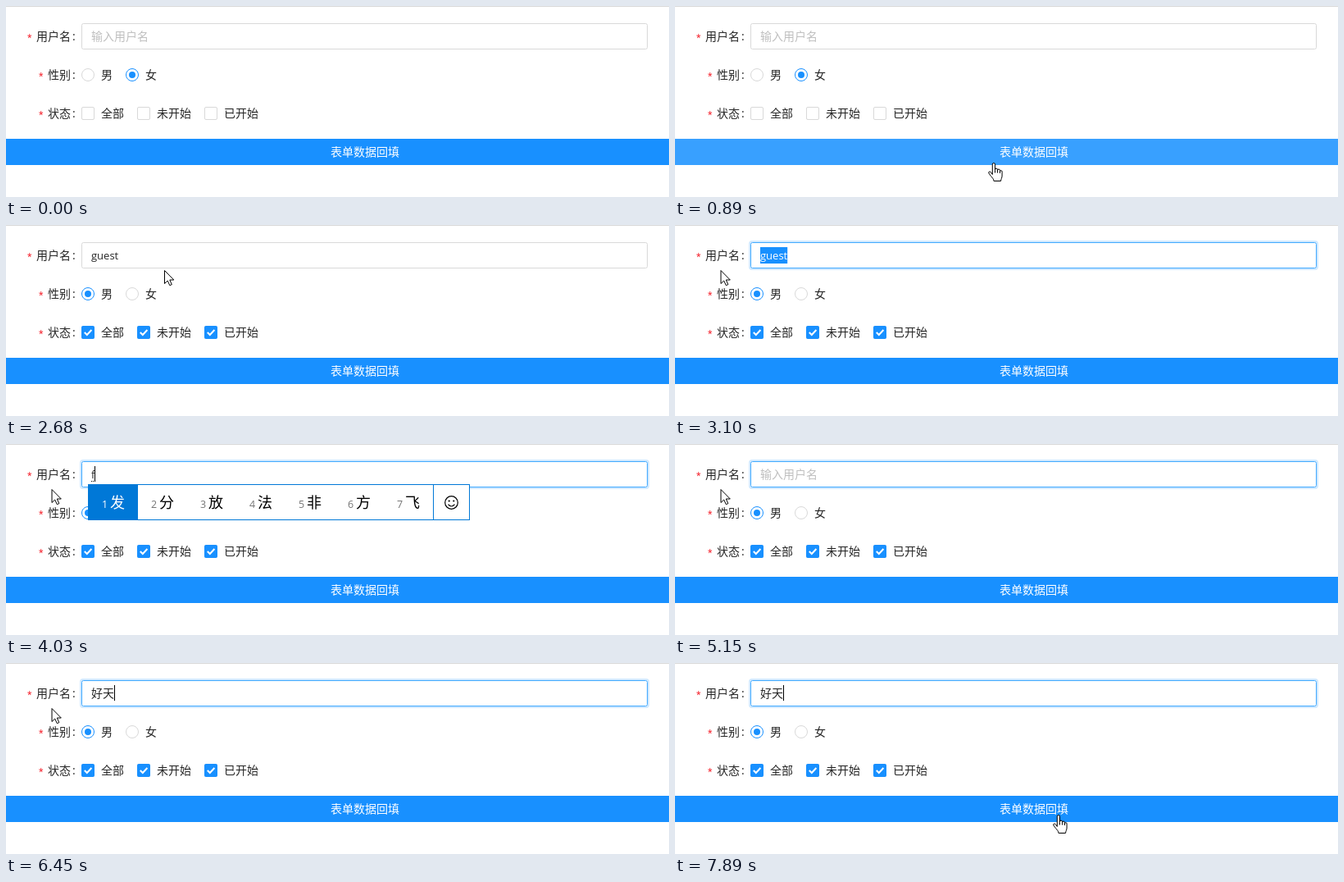
Write an HTML page that moves like this. It is 809 px wide and 233 px high and loops after 8 s.

```html
<!DOCTYPE html>
<html lang="zh-CN">
<head>
<meta charset="utf-8">
<style>
  html, body { margin: 0; width: 100%; height: 100%; overflow: hidden; background: #fff; }
  svg { display: block; font: 14px "Open Sans", "Noto Sans CJK SC", "Noto Sans CJK", sans-serif; }
  text { fill: #262626; white-space: pre; }
  .latin { font-size: 13px; }
  .cand { font-size: 18px; fill: #000; }
  .num { font-size: 12.5px; fill: #767676; }
  .star { fill: #f5222d; font-family: "Liberation Sans", sans-serif; }
  .hint { fill: #bfbfbf; }
  .white { fill: #fff; }
</style>
</head>
<body>
<svg id="stage" width="809" height="233" viewBox="0 0 809 233"></svg>
<script>
const LOOP = 8000, BLUE = '#1890ff', IME_BLUE = '#0078d7', GRAY = '#d9d9d9';
const stage = document.getElementById('stage');

// Timelines: [start ms, value], each value holds until the next one.
const cursorSteps = [[0, null],
  [500, ['arrow', 312, 214]], [620, ['arrow', 326, 202]], [740, ['arrow', 341, 191]],
  [890, ['hand', 382, 191]], [1130, ['hand', 392, 184]], [1430, ['hand', 392, 193]],
  [1580, ['arrow', 402, 204]], [1700, ['arrow', 412, 212]], [2290, ['arrow', 360, 211]],
  [2440, ['arrow', 280, 140]], [2560, ['arrow', 222, 86]], [2680, ['arrow', 193, 55]],
  [2800, ['beam', 165, 37]], [2950, ['beam', 146, 37]], [3100, ['arrow', 55.5, 55]],
  [7130, ['arrow', 62, 67]], [7250, ['arrow', 72, 86]], [7370, null],
  [7770, ['arrow', 500, 213]], [7890, ['hand', 461, 185]]];
const fillSteps = [[0, 0], [1430, .3], [1580, .8], [1700, .95], [1850, 1]];
const buttonSteps = [[0, BLUE], [890, '#38a0ff'], [1580, '#2898ff'], [1700, BLUE]];
const borderSteps = [[0, GRAY], [2800, '#8cc1ec'], [2950, '#40a9ff']];
const valueSteps = [[0, ''], [1430, 'guest'], [4030, 'f'], [5150, ''], [5550, 'h'], [5670, 'ha'],
  [5820, 'hao'], [5940, "hao't"], [6060, "hao'ti"], [6210, "hao'tia"], [6330, "hao'tian"], [6450, '好天']];
const caretSteps = [[0, false], [4030, true], [4560, false], [5550, true], [6980, false], [7490, true]];
const phrases = '好天 好听 好题 好图 好汤 好台 好';
const candidateSteps = [[0, ''], [4030, '发 分 放 法 非 方 飞'], [5150, ''], [5550, '好 会 和 还 后 很 号'],
  [5670, '哈 还 孩 害 海 含 汉'], [5820, '好 号 豪 👌 b（￣▽￣）d 浩 郝'], [5940, phrases], [6450, '']];

const at = (steps, t) => steps.findLast(([start]) => start <= t)[1];
const text = (x, y, s, cls = '') => `<text x="${x}" y="${y}" class="${cls}">${s}</text>`;
const rect = (x, y, w, h, attrs) => `<rect x="${x}" y="${y}" width="${w}" height="${h}" ${attrs}/>`;
const path = (d, attrs) => `<path d="${d}" ${attrs}/>`;

const shapes = {
  arrow: path('M.5.5V16.5L4.2 13 6.8 18.7 9.3 17.6 6.8 12H11.8Z', 'fill="#fff" stroke="#000"'),
  hand: path('M5.3 14.5V2.2a1.6 1.6 0 0 1 3.2 0V9.5 8.6a1.5 1.5 0 0 1 3 0V10.3 9.6a1.5 1.5 0 0 1 3 0' +
    'V11.5 11a1.3 1.3 0 0 1 2.6 0V16c0 3-1.5 4-1.5 6.5H7c0-2.5-2-4-3.5-6L.9 13c-.8-1.5 1-2.8 2.4-1.4z',
    'fill="#fff" stroke="#000"') + path('M8.5 9.5v3M11.5 10.3v2.2M14.5 11.5v1.5', 'stroke="#000"'),
  beam: path('M-3-8.5H-.5L0-8 .5-8.5H3M0-8V8M-3 8.5H-.5L0 8 .5 8.5H3', 'fill="none" stroke="#000"'),
};

const ctx = document.createElement('canvas').getContext('2d');
function textWidth(s, latin) {
  ctx.font = `${latin ? 13 : 14}px "Open Sans", "Noto Sans CJK SC", "Noto Sans CJK", sans-serif`;
  return ctx.measureText(s).width;
}

function label(x, y, s) {
  return text(x - 11, y + 7, '*', 'star') + text(x, y + 5, s) + text(81, y + 5, ':');
}

function radio(x, on, s) {
  return `<circle cx="${x}" cy="84" r="7.5" fill="#fff" stroke="${on > .2 ? BLUE : GRAY}"/>` +
    `<circle cx="${x}" cy="84" r="${4 * on}" fill="${BLUE}"/>` + text(x + 16, 89, s);
}

function checkbox(x, on, s) {
  return rect(x + .5, 123.5, 15, 15, `rx="1.5" fill="#fff" stroke="${GRAY}"`) +
    `<g opacity="${on}">` + rect(x, 123, 16, 16, `rx="2" fill="${BLUE}"`) +
    path(`M${x + 3.8} 131l3 3 5.6-6`, 'fill="none" stroke="#fff" stroke-width="2"') + '</g>' +
    text(x + 24, 136, s);
}

function input(t) {
  const value = at(valueSteps, t), latin = /^[a-z']+$/.test(value);
  const width = textWidth(value, latin), end = 104 + Math.round(width);
  const selected = t >= 3100 && t < 4030, composing = at(candidateSteps, t);
  let out = t >= 3100 ? rect(91, 20, 693, 34, `rx="3" fill="none" stroke="${BLUE}" stroke-opacity=".2" stroke-width="2"`) : '';
  out += rect(92.5, 21.5, 690, 31, `rx="2" fill="#fff" stroke="${at(borderSteps, t)}"`);
  if (selected) out += rect(104, 27, width, 20, `fill="${BLUE}"`);
  out += value ? text(104, 42, value, (latin ? 'latin' : '') + (selected ? ' white' : '')) : text(104, 42, '输入用户名', 'hint');
  if (composing) out += path(`M104 45.5H${end}`, 'stroke="#000" stroke-dasharray="1 1"');
  if (at(caretSteps, t)) out += rect(end, 27, 1, 19, '');
  return out;
}

function okHand(x) {
  return `<g transform="translate(${x} 63)" stroke="#5b3a12" stroke-width=".8" fill="#ffb92e">` +
    path('M4 10 3 3q1-2 2 0l2 6M7 9 7 1.5q1.5-1.5 2.5 0V9M9.5 9 11 2.5q2-1 2 .5V13q0 6-5 6-6 0-7-5z', '') +
    '<circle cx="5.5" cy="12.5" r="3.2" fill="#fff" stroke="#ffb92e" stroke-width="2"/></g>';
}

function candidateBar(list) {
  if (!list) return '';
  let x = 100, cells = '';
  list.split(' ').forEach((word, i) => {
    const first = i ? '' : ' white', emoji = word === '👌', face = word.startsWith('b');
    if (!i) cells += rect(100, 49, 41 + 20 * word.length, 44, `fill="${IME_BLUE}"`);
    cells += text(x + 17, 78, i + 1, 'num' + first);
    cells += emoji ? okHand(x + 28)
      : text(x + 27, 78, word.replace('▽', '<tspan font-size="10" dy="-2">▽</tspan><tspan dy="2">') + (face ? '</tspan>' : ''), 'cand' + first);
    x += emoji ? 69 : face ? 151 : 40 + 20 * word.length;
  });
  const frame = `fill="none" stroke="${IME_BLUE}"`;
  return rect(100, 49, x - 54, 44, 'fill="#fff"') + cells +
    rect(100.5, 49.5, x - 55, 43, frame) + path(`M${x + 1.5} 49V93`, frame) +
    `<g transform="translate(${x + 23.5} 71.5)"><circle r="7.8" fill="none" stroke="#000" stroke-width="1.2"/>` +
    path('M-4 2.2Q0 6.8 4 2.2', 'fill="none" stroke="#000" stroke-width="1.2"') +
    '<circle cx="-2.8" cy="-2" r="1.1"/><circle cx="2.8" cy="-2" r="1.1"/></g>';
}

function cursor(pose) {
  return pose ? `<g transform="translate(${pose[1]} ${pose[2]})">${shapes[pose[0]]}</g>` : '';
}

function draw(t) {
  const on = at(fillSteps, t);
  return rect(0, 0, 809, 1, `fill="${GRAY}"`) +
    label(37, 37, '用户名') + label(51, 84, '性别') + label(51, 131, '状态') + input(t) +
    radio(100, on, '男') + radio(154, 1 - on, '女') +
    checkbox(92, on, '全部') + checkbox(160, on, '未开始') + checkbox(242, on, '已开始') +
    rect(0, 162, 809, 32, `fill="${at(buttonSteps, t)}"`) + text(396, 183, '表单数据回填', 'white') +
    candidateBar(at(candidateSteps, t)) + cursor(at(cursorSteps, t));
}

let shown = '';
function tick() {
  const picture = draw(performance.now() % LOOP);
  if (picture !== shown) stage.innerHTML = shown = picture;
  requestAnimationFrame(tick);
}
tick();
</script>
</body>
</html>
```
